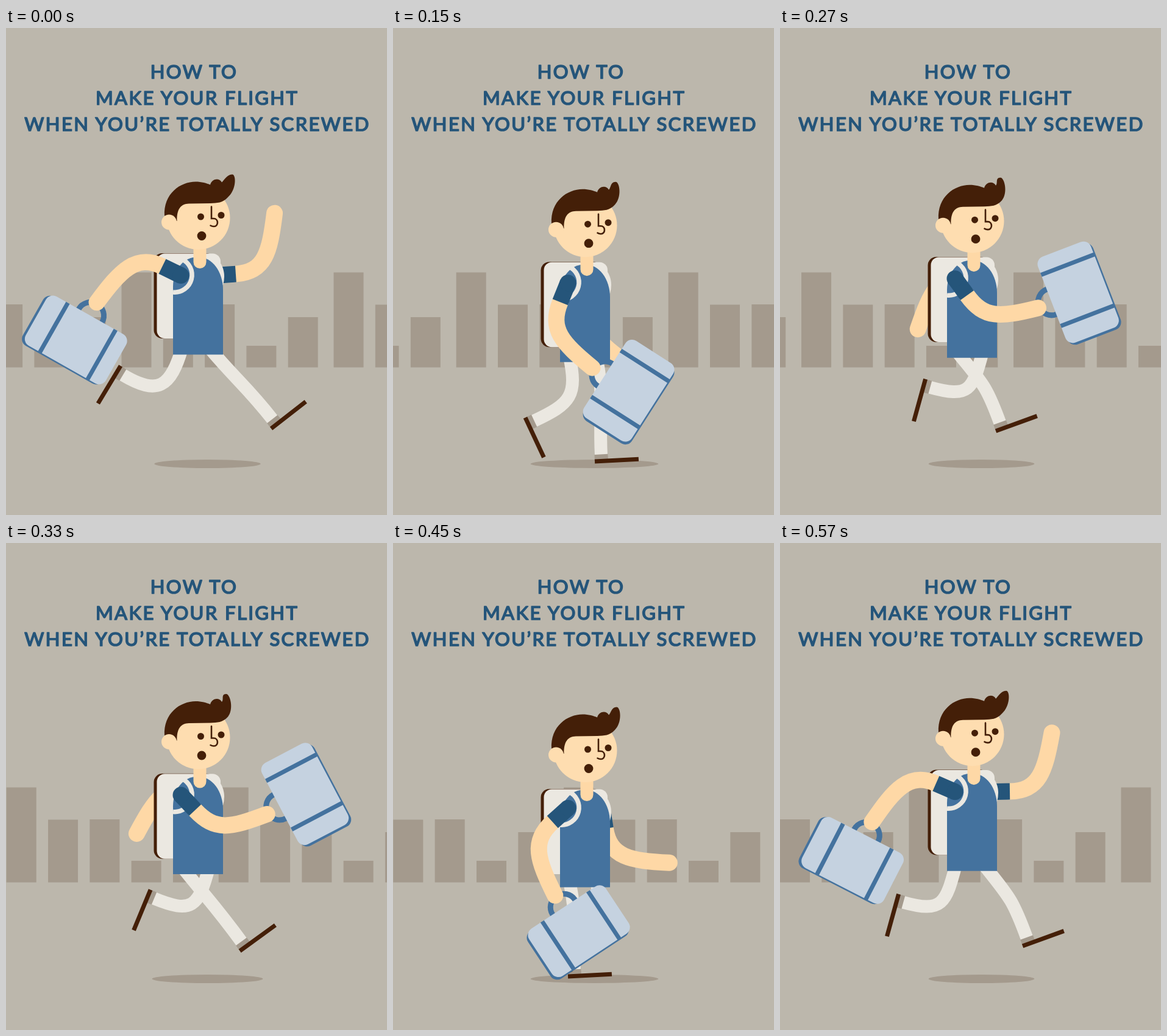
These frames come from a looping animation (625x800 px, 600 ms). An HTML page with a canvas:

```html
<!DOCTYPE html>
<html lang="en">
<head>
<meta charset="utf-8">
<title>Running for the flight</title>
<style>
  html, body { margin: 0; width: 625px; height: 800px; overflow: hidden; background: #bcb7ac; }
  canvas, svg { position: absolute; left: 0; top: 0; }
  text {
    font: 400 31px Lato, "Open Sans", sans-serif; letter-spacing: 2.4px; text-anchor: middle;
    fill: #25557a; stroke: #25557a; stroke-width: 1.7px; stroke-linejoin: round;
  }
</style>
</head>
<body>
<canvas id="stage" width="625" height="800"></canvas>
<svg width="625" height="800">
  <text x="308.5" y="83.2">HOW TO</text>
  <text x="313.5" y="126.2">MAKE YOUR FLIGHT</text>
  <text x="314" y="169.2">WHEN YOU’RE TOTALLY SCREWED</text>
</svg>
<script>
const ctx = document.getElementById('stage').getContext('2d');
const STEP = 30, COUNT = 20;
const BACK = '#bcb7ac', GREY = '#a49a8d', FACE = '#feddb0', SKIN = '#fed8a6', DARK = '#441f08',
  SHIRT = '#44729e', NAVY = '#25557a', WHITE = '#ebe8e1', PALE = '#c5d2e0';

// Key points over the 20-step cycle: step, arm swing (1 to -1), body drop
const POSE = [[0, 1, 0], [3, .28, 15], [7, -.56, 6.5], [11, -.99, 7.5], [15, .15, 29], [17, .62, 14]];
// One stride, shared by both legs: step, heel x from the hip, heel y, shoe angle in degrees
const STRIDE = [
  [0, 102, 658, -38], [3, 22, 709, -7], [5, -2, 712, -3], [7, -60, 657, 47], [10, -101, 555, 121],
  [13, -74, 630, 73], [15, -72, 640, 65], [17, 1, 655, 31], [19, 65, 662, -20]];

// Smooth periodic curve through the rows of a track.
function sample(track, t) {
  const n = track.length;
  const row = j => track[(j + n) % n];
  const time = j => row(j)[0] + COUNT * Math.floor(j / n);
  let i = n - 1;
  while (track[i][0] > t) i--;
  const span = time(i + 1) - time(i), u = (t - time(i)) / span, v = 1 - u;
  return row(i).slice(1).map((_, k) => {
    const val = j => row(j)[k + 1];
    const rate = j => (val(j + 1) - val(j)) / (time(j + 1) - time(j));
    const slope = j => {
      const before = time(j) - time(j - 1), after = time(j + 1) - time(j);
      return (rate(j - 1) * after + rate(j) * before) / (before + after);
    };
    return val(i) * v * v * (1 + 2 * u) + val(i + 1) * u * u * (3 - 2 * u)
      + span * u * v * (slope(i) * v - slope(i + 1) * u);
  });
}

const wave = (t, period) => Math.cos(2 * Math.PI * t / period);
const rad = deg => deg * Math.PI / 180;
const go = ([x, y], deg, d) => [x + d * Math.cos(rad(deg)), y + d * Math.sin(rad(deg))];

function fill(color, path) {
  ctx.fillStyle = color;
  ctx.fill(new Path2D(path));
}
function line(color, width, path, cap = 'butt') {
  ctx.strokeStyle = color;
  ctx.lineWidth = width;
  ctx.lineCap = cap;
  ctx.stroke(new Path2D(path));
}
function oval(color, x, y, rx, ry = rx) {
  ctx.fillStyle = color;
  ctx.beginPath();
  ctx.ellipse(x, y, rx, ry, 0, 0, 7);
  ctx.fill();
}
function box(color, x, y, w, h, r = 0) {
  ctx.fillStyle = color;
  ctx.beginPath();
  ctx.roundRect(x, y, w, h, r);
  ctx.fill();
}
function placed(x, y, deg, draw) {
  ctx.save();
  ctx.translate(x, y);
  ctx.rotate(rad(deg));
  draw();
  ctx.restore();
}

function skyline(k) {
  const heights = [156, 103, 103.5, 35.5, 82.5];
  for (let i = 0; i < 16; i++) {
    const h = heights[i % 5], x = 348 * Math.floor(i / 5) + 68.3 * (i % 5) - 158.5 - 17.16 * k;
    box(GREY, x, 557.5 - h, 49, h);
  }
}

function arm(shoulder, upper, fore, length, held) {
  const cuff = go(shoulder, upper, 34), hand = go(go(shoulder, upper, 86), fore, length);
  if (held) placed(...hand, fore - 97, held);
  line(SKIN, 27, `M${cuff} C${go(cuff, upper, 48)} ${go(hand, fore, -65)} ${hand}`, 'round');
  line(NAVY, 27, `M${shoulder} L${cuff}`);
  oval(NAVY, ...shoulder, 13.5);
}

function leg(hip, t) {
  const [x, y, shoe] = sample(STRIDE, t % COUNT), heel = [hip[0] + x, y];
  const ankle = go(go(heel, shoe, 11), shoe - 90, 10), thigh = 78 - 28 * wave(t, COUNT);
  line(WHITE, 21, `M${hip} C${go(hip, thigh, 68)} ${go(ankle, shoe - 90, 68)} ${ankle}`);
  placed(...heel, shoe, () => {
    box(GREY, 0, -11, 22, 9);
    box(DARK, 0, -3.5, 72, 7);
  });
}

// Hangs from the hand at the local origin.
function suitcase() {
  line(SHIRT, 9, 'M-20.5 24 a22 22 0 1 1 44 0 a22 22 0 1 1 -44 0');
  box(SHIRT, -79, 26.5, 151, 93, 13);
  box(PALE, -75, 24, 151, 93, 13);
  for (const x of [-41, 49]) box(SHIRT, x - 3.5, 24, 7, 94);
}

function backpack() {
  box(DARK, 242.5, 370, 100, 140, 14);
  box(WHITE, 247.5, 370.5, 104.5, 139.5, 13);
  fill(WHITE, 'M330 371 C350 376 358 393 358 408 Q358 415 356 422 L330 420 Z');
}

function torso() {
  fill(SHIRT, 'M274 536.5 V425 C274 396 292 376 315 376 C338 376 356 400 356 430 V536.5 Z');
  line(WHITE, 7.5, 'M288 379.5 A28.5 28.5 0 0 1 274 434');
  box(SKIN, 307.5, 350, 21, 45, 10.5);
}

function head(sway) {
  const tip = 371 - sway;
  oval(FACE, 315.5, 312, 52);
  fill(DARK, `M260 309 C258 272 286 252.5 311 252.5 C321 252.5 329 255 335 257.5
    C338 247 350 246 354 253.5 C358 250 ${tip - 9} 241 ${tip} 240.5
    C${tip + 7} 240.5 ${378 - .4 * sway} 266 364 278 C355 287.5 347 287.5 335 288
    L300 288.5 C287 289 280 297 280.5 317 L267 319 Z`);
  oval(FACE, 267.5, 319, 12.5);
  oval(DARK, 319.5, 310, 5.5);
  oval(DARK, 353, 307.5, 5.5);
  oval(DARK, 321, 341.5, 7.4);
  line(DARK, 2.6, 'M337 293.5 V313 H340.5 C349 313 349 326 341 326 Q338 326 335.5 324.5', 'round');
}

function draw(k) {
  const [swing, drop] = sample(POSE, k);
  box(BACK, 0, 0, 625, 800);
  skyline(k);
  oval(GREY, 330.5, 716, 96 - 9.5 * wave(k + .6, COUNT / 2), 7);
  arm([343, 406.5 + drop], 96 - 100 * swing, 18 - 101 * swing, 97);
  leg([289, 525 + drop], k + COUNT / 2);
  leg([333, 525 + drop], k);
  placed(0, 1.17 * drop, 0, backpack);
  placed(0, drop, 0, () => {
    torso();
    head(5 - 5 * swing);
  });
  arm([287, 406.5 + drop], 126 + 80 * swing, 52.5 + 74 * swing, 95 + 7 * swing, suitcase);
}

function tick() {
  draw(Math.floor(performance.now() / STEP) % COUNT);
  requestAnimationFrame(tick);
}
tick();
</script>
</body>
</html>
```
